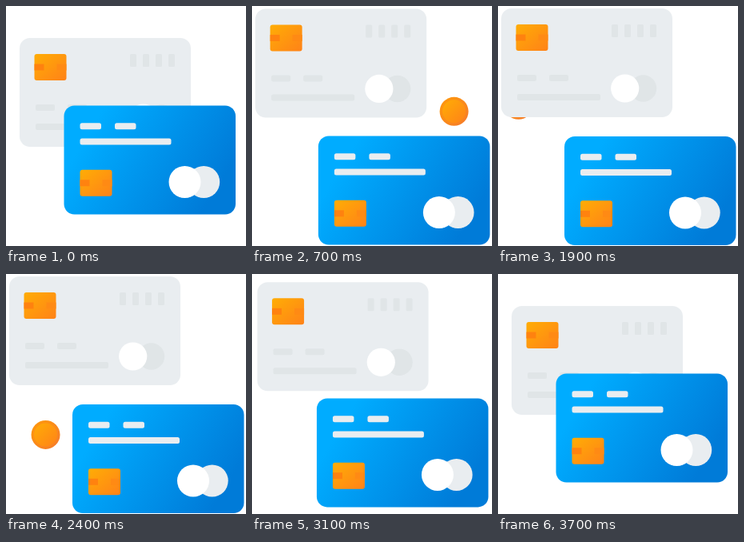
These frames come from a looping animation (300x300 px, 4800 ms). An HTML page:

```html
<!DOCTYPE html>
<html lang="en">
<head>
<meta charset="utf-8">
<title>Cards and coins</title>
<style>
  html, body { margin: 0; width: 100%; height: 100%; overflow: hidden; background: #fff; }
  svg { display: block; width: 100%; height: 100%; }
</style>
</head>
<body>
<svg viewBox="0 0 300 300">
  <defs>
    <linearGradient id="blue" gradientUnits="userSpaceOnUse" x1="38" y1="22" x2="186" y2="112">
      <stop offset="0" stop-color="#00acff"/>
      <stop offset="1" stop-color="#007bd8"/>
    </linearGradient>
    <linearGradient id="gold" x1="0" y1="0" x2="1" y2="1">
      <stop offset="0" stop-color="#ffad05"/>
      <stop offset="1" stop-color="#ff8218"/>
    </linearGradient>
    <linearGradient id="rim" x1="0" y1="0" x2="1" y2="1">
      <stop offset="0" stop-color="#ff9a0a"/>
      <stop offset="1" stop-color="#f57a2c"/>
    </linearGradient>
    <g id="chip">
      <rect width="40" height="33" rx="3" fill="url(#gold)"/>
      <path d="M0 12.5h12v8H0z" fill="#ff820f"/>
      <path d="M28 12.5h12v8H28z" fill="#ff8a14"/>
    </g>
    <g id="coin">
      <circle r="18" fill="url(#rim)"/>
      <circle r="14.5" fill="url(#gold)"/>
    </g>
  </defs>
  <g id="coins"></g>
  <g id="back">
    <rect width="214" height="136" rx="13" fill="#e9edf0"/>
    <use href="#chip" x="18.5" y="20"/>
    <g fill="#e0e5e7">
      <rect x="138" y="20" width="8" height="16" rx="1.5"/>
      <rect x="154" y="20" width="8" height="16" rx="1.5"/>
      <rect x="170" y="20" width="8" height="16" rx="1.5"/>
      <rect x="186" y="20" width="8" height="16" rx="1.5"/>
      <rect x="20" y="83" width="24" height="8" rx="2"/>
      <rect x="60" y="83" width="24" height="8" rx="2"/>
      <rect x="20" y="107" width="104" height="8" rx="2"/>
      <circle cx="177.5" cy="100" r="16.7"/>
    </g>
    <circle cx="154.7" cy="100" r="17.6" fill="#fff"/>
  </g>
  <g id="front">
    <rect width="214.5" height="136" rx="13" fill="url(#blue)"/>
    <use href="#chip" x="20" y="80.3"/>
    <g fill="#e9edf0">
      <rect x="20" y="21.8" width="26.5" height="8" rx="2.5"/>
      <rect x="63.5" y="21.8" width="26.5" height="8" rx="2.5"/>
      <rect x="20" y="41" width="114" height="8" rx="2.5"/>
      <circle cx="174.7" cy="95.5" r="20"/>
    </g>
    <circle cx="151" cy="95.5" r="20" fill="#fff"/>
  </g>
</svg>
<script>
const LOOP = 4800, COIN_TIME = 455, COIN_GAP = 265, COIN_COUNT = 3;
const byId = id => document.getElementById(id);
const mix = (a, b, p) => a + (b - a) * p;
const place = (el, x, y) => el.setAttribute('transform', `translate(${x.toFixed(2)} ${y.toFixed(2)})`);

const cards = [
  { el: byId('back'), closed: [17, 40], open: [4, 3] },
  { el: byId('front'), closed: [72.5, 124.5], open: [83, 163] }
];

// Quadratic curves: out of the front card, then out of the back card.
const flights = [
  { start: 1044 - 2 * COIN_GAP, path: [[258, 185], [260, 87], [198, 87]] },
  { start: 1860, path: [[25, 110], [28, 228], [110, 228]] }
];

const coins = flights.flatMap(({ start, path }) =>
  Array.from({ length: COIN_COUNT }, (_, i) => {
    const el = document.createElementNS('http://www.w3.org/2000/svg', 'use');
    el.setAttribute('href', '#coin');
    byId('coins').append(el);
    return { el, path, start: start + i * COIN_GAP };
  }));

function ease(t, from, to) {
  const p = Math.min(1, Math.max(0, (t - from) / (to - from)));
  return (1 - Math.cos(Math.PI * p)) / 2;
}

function curve([a, b, c], p, axis) {
  return mix(mix(a[axis], b[axis], p), mix(b[axis], c[axis], p), p);
}

function draw(t) {
  const spread = ease(t, 55, 750) - ease(t, 2890, 3610);
  for (const { el, closed, open } of cards) {
    place(el, mix(closed[0], open[0], spread), mix(closed[1], open[1], spread));
  }
  for (const { el, path, start } of coins) {
    const s = (t - start) / COIN_TIME;
    const flying = s >= 0 && s <= 1;
    el.style.display = flying ? '' : 'none';
    if (!flying) continue;
    const p = 0.64 * s + 0.36 * s * s;
    place(el, curve(path, p, 0), curve(path, p, 1));
  }
}

const begin = performance.now();
function tick() {
  draw((performance.now() - begin) % LOOP);
  requestAnimationFrame(tick);
}
tick();
</script>
</body>
</html>
```
